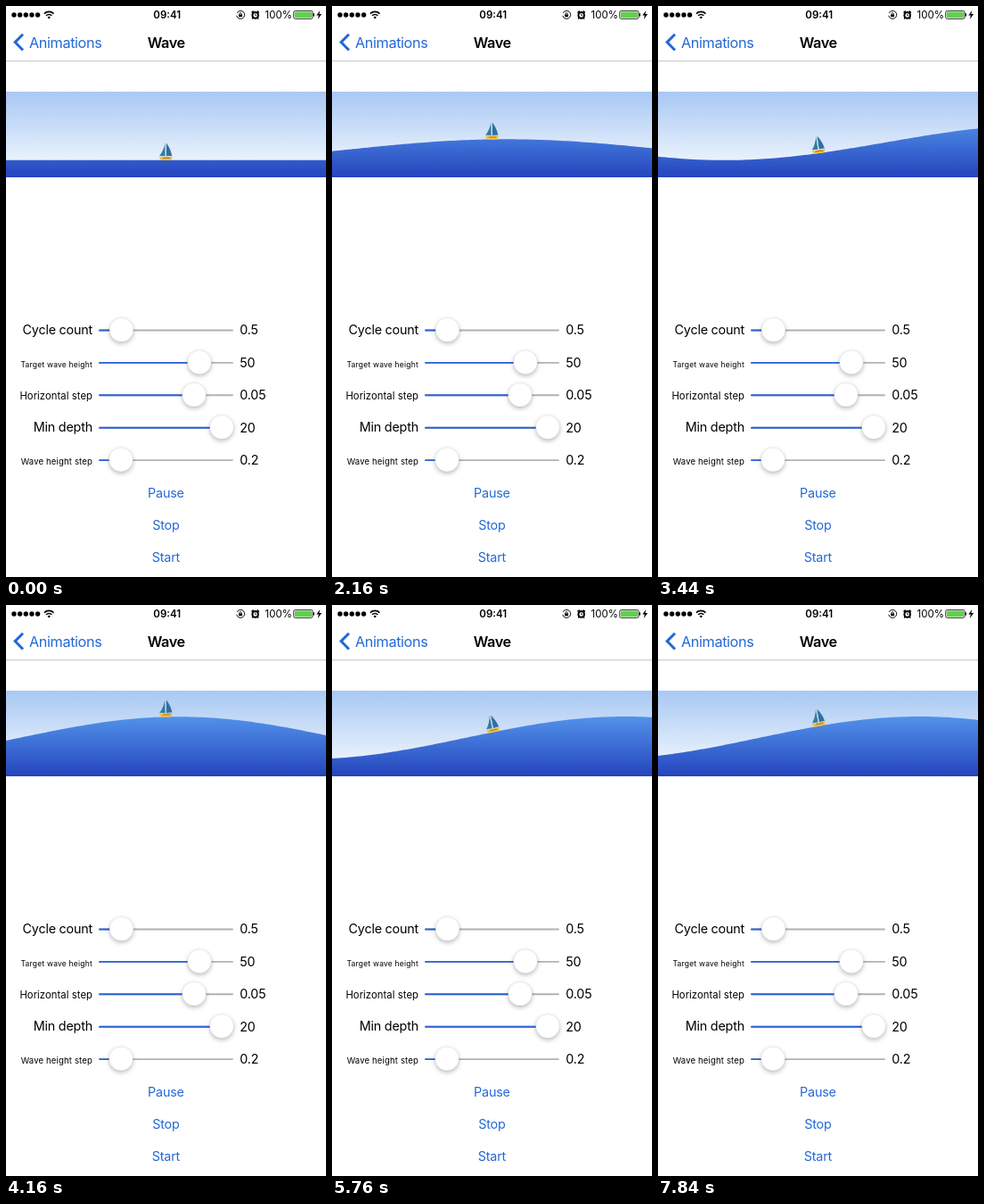
Animation, 359 px wide and 640 px high, one loop 8000 ms. Source, as an HTML page:

```html
<!DOCTYPE html>
<html lang="en">
<head>
<meta charset="utf-8">
<title>Wave</title>
<style>
  html, body { margin: 0; width: 100%; height: 100%; overflow: hidden; background: #fff; }
  svg { display: block; width: 359px; height: 640px; font: 14.36px Inter, Roboto, sans-serif; }
  .blue { fill: #2468d6; }
  .mid { text-anchor: middle; }
  .nav { font-size: 16.27px; letter-spacing: -.4px; }
  .body { letter-spacing: -.2px; }
  .thumb { fill: #fff; stroke: #0002; stroke-width: .5; filter: drop-shadow(0 2.8px 2.4px #0004); }
</style>
</head>
<body>
<svg viewBox="0 0 359 640">
  <defs>
    <linearGradient id="sky" x2="0" y2="1">
      <stop stop-color="#a8c8f3"/><stop offset="1" stop-color="#f9fcff"/>
    </linearGradient>
    <linearGradient id="sea" gradientUnits="userSpaceOnUse" x1="0" x2="0" y1="125" y2="192">
      <stop stop-color="#5292e9"/><stop offset="1" stop-color="#2544bd"/>
    </linearGradient>
  </defs>

  <!-- status bar -->
  <path d="M9 10h27" stroke="#000" stroke-width="5.4" stroke-linecap="round" stroke-dasharray="0 6.65"/>
  <g fill="none" stroke="#000" stroke-width="1.6">
    <path d="M42.9 8.6a7.4 7.4 0 0 1 10.6 0M45 10.8a4.5 4.5 0 0 1 6.4 0"/>
    <path d="M48.2 14.4l-1.7-1.8a2.4 2.4 0 0 1 3.4 0z" fill="#000" stroke="none"/>
  </g>
  <text class="mid" x="180.7" y="14.1" font-size="11.5" font-weight="600">09:41</text>
  <g fill="none" stroke="#000">
    <path d="M259.2 7.8a4.5 4.5 0 1 1-.4 3"/>
    <path d="M261.9 9.6V8.8a1.2 1.2 0 0 1 2.4 0v.8" stroke-width=".8"/>
    <path d="M261.1 9.4h4v2.8h-4z" fill="#000" stroke="none"/>
    <circle cx="279.7" cy="10.4" r="3.3" stroke-width="2"/>
    <path d="M275.6 7.6l2.1-2M283.8 7.6l-2.1-2M277.2 13.3l-1 1.1M282.2 13.3l1 1.1" stroke-width="1.5"/>
    <path d="M279.7 8.6v2h1.5" stroke-width=".8"/>
    <rect x="322.7" y="5.4" width="21.4" height="9" rx="1.8" stroke-width=".8"/>
    <path d="M345.2 8.3v3.2" stroke-width="1.4"/>
    <rect x="323.8" y="6.5" width="19.2" height="6.8" rx=".8" fill="#62cf4e" stroke="none"/>
    <path d="M352.3 5l-4 5.6h2.5l-1 4.3 4.3-6h-2.7z" fill="#000" stroke="none"/>
  </g>
  <text x="290.5" y="14.1" font-size="11.5">100%</text>

  <!-- navigation bar -->
  <path d="M19 31.7l-8.8 8.9 8.8 8.9" fill="none" stroke="#2468d6" stroke-width="3"/>
  <text class="nav blue" x="26" y="46.6">Animations</text>
  <text class="nav mid" x="179.8" y="46.6" font-weight="600">Wave</text>
  <path d="M0 61.7h359" stroke="#b6b6b8" stroke-width=".8"/>

  <!-- scene -->
  <rect y="96" width="359" height="96" fill="url(#sky)"/>
  <path id="water" fill="url(#sea)"/>
  <g id="boat">
    <path d="M-.9-9.6Q-2.6-1-7.4 4.8L-.9 5.2z" fill="#327d9e"/>
    <path d="M.4-9.6Q5.2-3 6.8 4.8L.4 5.2z" fill="#2d70a8"/>
    <path d="M-.2-10V6" stroke="#cfd9cf" stroke-width="1"/>
    <path d="M-7.8 6L7.4 5.6 5.7 9.8H-5.6z" fill="#f2bd3e"/>
    <path d="M-3.7 7.2h8.3" stroke="#b8702c" stroke-width="1"/>
  </g>

  <g id="controls"></g>
</svg>
<script>
  const $ = id => document.getElementById(id);

  // label, value, thumb x, label size, label tracking
  const sliders = [
    ["Cycle count", "0.5", 129.5, 14.36, -.22],
    ["Target wave height", "50", 217, 8.5, .22],
    ["Horizontal step", "0.05", 211, 11.3, .05],
    ["Min depth", "20", 242, 14.36, -.2],
    ["Wave height step", "0.2", 129, 9.55, .15],
  ];
  const rowY = i => 363.5 + 36.4 * i;

  $("controls").innerHTML = sliders.map(([label, value, x, size, track], i) => {
    const y = rowY(i);
    return `<text x="97" y="${y + 4.7}" text-anchor="end" font-size="${size}" letter-spacing="${track}">${label}</text>
      <path d="M105 ${y}H254" stroke="#b2b2b2" stroke-width="1.9" stroke-linecap="round"/>
      <path d="M105 ${y}H${x}" stroke="#2a66d6" stroke-width="1.9" stroke-linecap="round"/>
      <circle class="thumb" cx="${x}" cy="${y - .6}" r="13.4"/>
      <text class="body" x="262.3" y="${y + 4.8}">${value}</text>`;
  }).join("") + ["Pause", "Stop", "Start"].map((name, i) =>
    `<text class="body mid blue" x="179.4" y="${rowY(i + 5) + 5}">${name}</text>`).join("");

  const LOOP = 8000, WIDTH = 359, BOTTOM = 192, SCALE = WIDTH / 375;
  const K = Math.PI / WIDTH; // half a cycle across the stage

  // The scene advances in 80 ms ticks and skips roughly every sixth one.
  function stepAt(ms) {
    const tick = Math.floor(ms / 80);
    return tick - Math.floor((tick + 4.45) / 6.042);
  }

  function draw(ms) {
    const n = Math.max(0, stepAt(ms) - 1.53);
    const phase = .3 * n;
    const amp = Math.min(50, 1.2 * n) * SCALE / 2;
    const surface = x => BOTTOM - 20 * SCALE - amp * (1 + Math.sin(K * x + phase));

    let d = `M0 ${BOTTOM}`;
    for (let x = 0; x < WIDTH + 4; x += 4) d += `L${x} ${surface(x).toFixed(2)}`;
    $("water").setAttribute("d", d + `V${BOTTOM}z`);

    const mid = WIDTH / 2;
    const tilt = Math.atan(-amp * K * Math.cos(K * mid + phase)) * 180 / Math.PI;
    $("boat").setAttribute("transform", `translate(${mid} ${surface(mid) - 9.7}) rotate(${tilt})`);
  }

  function frame() {
    draw(performance.now() % LOOP);
    requestAnimationFrame(frame);
  }
  frame();
</script>
</body>
</html>
```
